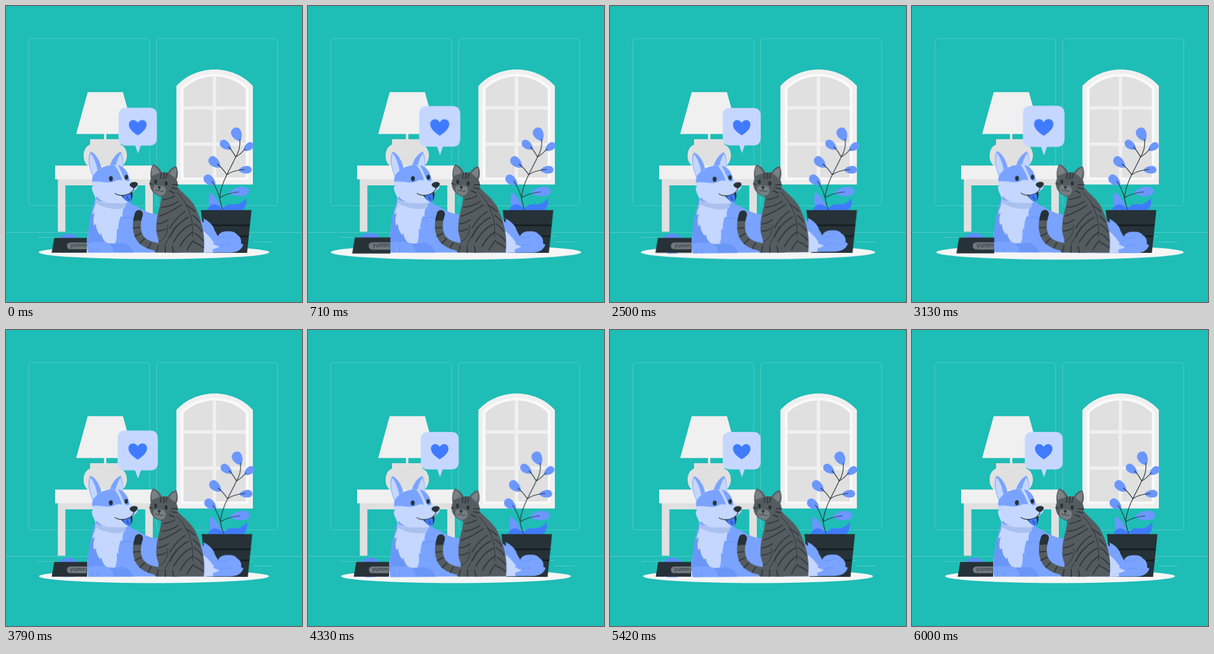
An HTML page without scripts for the animation above (6040 ms loop, 500 px wide and 500 px high).

```html
<!DOCTYPE html>
<html lang="en">
<head>
<meta charset="utf-8">
<title>Cat and dog at home</title>
<style>
html, body { margin: 0; width: 100%; height: 100%; overflow: hidden; background: #1ebdb6; }
svg { display: block; width: 100%; height: 100%; }

.rug, .bowl, .bubble, .dog, .cat, .plant { animation: 6.04s linear -15ms infinite; }
.rug { animation-name: swell; transform-origin: 250px 416.3px; }
.bowl { animation-name: swell; transform-origin: 107px 402px; }
.bubble { animation-name: pulse; transform-origin: 222.5px 210.5px; }
.dog { animation-name: sway; transform-origin: 248px 331px; }
.cat { animation-name: sway; transform-origin: 275px 342px; }
.plant { animation-name: shake; }

@keyframes swell {
  0%, 29.8%, 39.74%, 59.6%, 100% { transform: scale(1); }
  9.934%, 49.67% { transform: scale(1.1); }
}
/* four double beats per loop */
@keyframes pulse {
  0%, 7.45%, 9.934%, 14.9%, 24.834%, 32.284%, 34.768%, 39.734%, 49.668%,
  57.118%, 59.602%, 64.568%, 74.502%, 81.952%, 84.436%, 89.402%, 100% { transform: scale(1); }
  2.483%, 12.417%, 27.317%, 37.251%, 52.151%, 62.085%, 76.985%, 86.919% { transform: scale(1.1); }
}
/* four swings per loop */
@keyframes sway {
  0%, 99.338%, 100% { transform: rotate(0deg); }
  6.209%, 31.043%, 55.877%, 80.71% { transform: rotate(1deg); }
  18.626%, 43.46%, 68.294%, 93.128% { transform: rotate(-1deg); }
}
@keyframes shake {
  0%, 99.338%, 100% { transform: translateX(0); }
  9.934%, 89.404% { transform: translateX(-1px); }
  19.868%, 79.47% { transform: translateX(2px); }
  29.801%, 49.669%, 69.536% { transform: translateX(-4px); }
  39.735%, 59.603% { transform: translateX(4px); }
}

.pale { fill: #f0f0f0; }
.grey { fill: #e0e0e0; }
.white { fill: #fafafa; }
.dark { fill: #263238; }
.fur { fill: #79a3ff; }
.shade { fill: #6a96f8; }
.light { fill: #c5d7ff; }
.blue { fill: #407bff; }
.leaf { fill: #6b97ff; }
.coat { fill: #555c60; }
.line { fill: none; stroke: #263238; stroke-linecap: round; stroke-linejoin: round; }
.hair { fill: none; stroke: #ebebeb; stroke-width: .28; }
.fold { fill: none; stroke: #5f8df2; stroke-width: .8; stroke-linecap: round; }
.tabby { fill: none; stroke: #30393e; stroke-width: 2; stroke-linecap: round; }
text { font: 9px Inter, "Open Sans", sans-serif; fill: #263238; }
</style>
</head>
<body>
<svg viewBox="0 0 500 500">
  <defs>
    <path id="leaf" d="M0 0C4-7 13-10 19-8C26-5 26 5 20 8C13 10 5 7 0 0Z"/>
    <clipPath id="cut"><path d="M70 380H136.5V425H70Z"/></clipPath>
    <clipPath id="tip"><path d="M210 340H240V362L212 363Z"/></clipPath>
  </defs>

  <g class="hair">
    <rect x="38.3" y="55.1" width="204.4" height="282.6" rx="5.5"/>
    <rect x="254.5" y="55.1" width="204.4" height="282.6" rx="5.5"/>
    <path d="M0 382.4H500M52.5 391H95.6M104.5 391H111M396.6 389.4H416M416.8 398.5H450"/>
  </g>

  <g id="window">
    <path class="pale" d="M287.8 301.5V135C322 98 383 98 417 135V301.5Z"/>
    <path class="white" d="M295.6 293.5V138C326 107 379 107 409.3 138V293.5Z"/>
    <path class="grey" d="M299.8 289.8V140C328 112 377 112 405 140V289.8Z"/>
    <path class="pale" d="M349.2 118H355V290H349.2ZM299.8 169.2H405V175H299.8ZM299.8 230.5H405V236.3H299.8Z"/>
  </g>

  <g id="lamp">
    <path class="pale" d="M138 145.5H197.5L217 216.3H118.5ZM165.6 216H169.4V226H165.6Z"/>
    <path class="grey" d="M142 225H193.3V234C201 237 205 246 204.2 255C203 262 200 267 196 271H139C134 266 131 260 131.2 254C130.500 245 135 236.500 142 234Z"/>
  </g>
  <g id="table">
    <path class="grey" d="M87.5 292H248V303H100.3V381.3H87.5ZM235.3 292H248V381H235.3Z"/>
    <path class="pale" d="M83 269.5H253V292.7H83Z"/>
  </g>

  <ellipse class="rug" cx="250" cy="416" rx="194.2" ry="11.4" fill="#f5f5f5"/>

  <g class="plant">
    <g class="leaf">
      <path d="M344 315C352 318 358 328 366 345H347C341 337 342 325 344 315Z"/>
      <use href="#leaf" transform="translate(396 228) rotate(-118)"/>
      <use href="#leaf" transform="translate(401.5 244.5) rotate(-38) scale(.82 .72)"/>
      <use href="#leaf" transform="translate(380.5 242) rotate(-144) scale(.93 .8)"/>
      <use href="#leaf" transform="translate(362 272.5) rotate(-139) scale(1 .9)"/>
      <use href="#leaf" transform="translate(392.5 277.5) rotate(-4) scale(.92 .76)"/>
      <use href="#leaf" transform="translate(354 302) rotate(-143) scale(.98 .88)"/>
      <use href="#leaf" transform="translate(376.5 315.5) rotate(-6) scale(1.4 .92)"/>
    </g>
    <path class="blue" d="M340 345C342 337 350 333 356 336C360 337 363 340 366 343C369 337 376 334 383 335C393 336 400 332 405.5 324C407 333 405 340 400 345Z"/>
    <g class="line" stroke-width="1.2">
      <path d="M366 343Q361 330 361 322C363 306 368 295 373 285C379 273 384 264 388 255C394 246 396 237 395 225"/>
      <path d="M376 238Q382 244 388 255Q396 251 404 241M357 267Q365 273 373 285Q382 278 403 276M348 296Q355 305 361 324Q373 316 393 314"/>
    </g>
    <path class="dark" d="M329.2 344.8H414.7L407.2 417H337.6Z"/>
    <path fill="#151d21" d="M332 369H412.2L411.9 371.8H332.4ZM334 387.8H410.2L410 390.2H334.4Z"/>
  </g>

  <g class="dog">
    <path class="fur" d="M96 402Q104 398 113 402V416.5H96Z"/>
    <path class="fur" d="M152 318C148 340 140 358 139.5 380C136 392 136 404 138.5 416.5H345L352 398C350 384 340 369 327 360C300 350 265 354 248 351C234 348 224 339 211 334L205 320Z"/>
    <path class="fur" d="M331 358C342 362 351 371 352 378L358 389C360 384 365 380 374 380.500C382 380 388 382 390 386C396 389 398 395 397 401L401 403C398 412 390 417 376 416.500H334V360Z"/>
    <path class="light" d="M333 416.500V380C341 385 347 394 351 399L350 402C354 404 357 405 361 406C356 409 352 410 349 411L350 416.500Z"/>
    <path class="fold" d="M358 389C365 393 374 391 379 387M360 406C367 402 372 402 377 403"/>
    <path class="shade" d="M150 338C145 350 140 364 139.500 382L138 400H170L160 368Z"/>
    <path class="light" d="M151 329C152 338 147 343 146 352L150 350C147 359 147 365 149 371L152 368C152 376 155 382 159 387L161 384C162 391 165 396 170 401H184C188 394 187 384 187 376L190 378C189 368 192 361 194 355L197 356C196 347 199 340 203 333Z"/>
    <path fill="#aac0ee" d="M151 325C162 335 185 334 204 331L201 341C185 346 166 341 151 333Z"/>
    <path class="shade" d="M169 400C180 403 186 402 194 400C205 401 212 407 215 416.500H177C179 407 175 401 169 400Z"/>
    <path class="fur" d="M138 407C139 399 148 397 157 399C170 397 181 402 182 416.500H139Q136.500 411 138 407Z"/>
    <path class="fold" d="M145 408Q143 412 145 416M155 408Q153 412 155 416M193 360C203 354 216 357 226 363"/>

    <path class="fur" d="M148 290C140 277 137 254 143 246C151 249 159 261 161.500 275Z"/>
    <path class="light" d="M148 288C141 276 139 257 143 249C149 256 155 271 155 287Z"/>
    <path class="fur" d="M175 272C178 260 185 250 193.500 246C198 253 198.500 265 197 276Z"/>
    <path class="light" d="M185 271C187 262 190 254 193.800 249C197 256 198 266 196.500 276Z"/>
    <path class="light" d="M148 285C156 273 168 269 182 268.500C194 268 204 276 207 287C209 294 212 297 217 298C224 299 224 306 219 310L213 315L210 331C200 334 186 334 175 331C165 331 157 328 154 322L151 325C150 319 145 314 145 306L147 304C144 297 145 290 148 285Z"/>
    <path class="fur" d="M148 285C156 274 168 269 183 268.500C190 278 194 286 196 295C186 292 184 297 178 298C167 299 156 295 146 297C145 292 146 288 148 285Z"/>
    <path class="fur" d="M189 269C200 271 206 280 208 291C210 296 205 297 202 295C197 288 195 278 189 269Z"/>
    <ellipse class="dark" cx="177.200" cy="291.700" rx="3.300" ry="4.200"/>
    <ellipse class="dark" cx="203.300" cy="289.300" rx="3" ry="4.100"/>
    <path class="dark" d="M209 301C211 297 219 296 222 299C224 302 220 306 216 308C212 306 208 304 209 301Z"/>
    <path class="dark" d="M194 319.500C201 321 209 318 213 313.500C215 320 213 327 209 331C203 330 198 325 194 319.500Z"/>
    <path class="blue" d="M197 321.500C201 318 207 319 210 317C212 323 212 329 208 332C203 330 199 326 197 321.500Z"/>
    <path class="line" stroke-width="1.100" d="M184 316.500C192 322 206 321 214 312Q216 311 216 307M204 322L207 327"/>
  </g>

  <g class="bubble">
    <path class="light" d="M203 172.300H242Q254.500 172.300 254.500 184.800V223Q254.500 235.500 242 235.500H227.500L223 248.700L218.300 235.500H203Q190.500 235.500 190.500 223V184.800Q190.500 172.300 203 172.300Z"/>
    <path class="blue" d="M222.500 218.500C213 212.500 207.500 206.500 207.700 200C208 191.500 218.500 190 222.500 197.500C226.500 190 237 191.500 237.300 200C237.500 206.500 232 212.500 222.500 218.500Z"/>
  </g>

  <g class="cat">
    <path class="coat" d="M262 318C263 335 254 353 254 370C252 384 258 391 258 399L250 407Q249 413 253 416.500H334C337 392 333 368 320 340C313 326 298 316 288 304Z"/>
    <g fill="none" stroke-linecap="round" stroke-width="13.500">
      <path stroke="#555c60" d="M224.500 351.500C219 368 220 384 228 394C238 406 260 410 292 410"/>
      <path stroke="#263238" clip-path="url(#tip)" d="M224.500 351.500C219 368 220 384 228 394"/>
    </g>
    <path class="tabby" d="M215.500 375L226 374M218 389L228 384M226 401L234 393M240 409L245 400M255 415L257 405M269 416V405M283 416L281 406"/>
    <path class="tabby" d="M266 327Q278 325 285 321M263 340Q278 339 291 330M259 355Q277 349 296 336M256 368Q266 367 274 361M256 380Q264 380 270 376M277 375Q288 356 303 347M277 390Q288 367 308 357M283 399Q296 376 313 369M294 406Q304 388 316 382M306 412Q311 402 317 396M304 336Q313 341 319 347M316 354Q323 359 327 365M318 368Q327 374 331 381M319 384Q327 389 333 396M318 399Q326 402 333 408"/>
    <path class="line" stroke-width="1" d="M289 315C307 334 318 358 315 390M258 398C269 394 274 382 273 370M269 402C275 393 280 381 287 372"/>
    <path class="coat" d="M244.500 292C243 280 245 271 249 267.500C256 270 261 276 263 281L274 281C277 275 283 271 288 271C291 279 291 287 288 293C292 301 291 312 284 317C276 324 262 325 254 319C245 314 240 302 244.500 292Z"/>
    <path fill="#7a8185" d="M246 287C245 279 246 273 249.500 270C255 273 258 278 259.500 282ZM276 283C279 277 283 274 286.800 273.500C289 280 288 286 285.500 291Z"/>
    <path fill="#777e82" d="M249 307C251 302 255 302 259 304C264 302 270 305 270 311C270 318 264 322 258 320C252 317 248 313 249 307Z"/>
    <path class="tabby" d="M262 283L261 291M267 282L266 292M272 283L270 291M290 302L281 302M289 309L280 307M284 316L276 312M243 300L247 301"/>
    <ellipse class="dark" cx="252.800" cy="297" rx="2.500" ry="3.700"/>
    <ellipse class="dark" cx="270.500" cy="299.800" rx="2.500" ry="3.700"/>
    <path class="dark" d="M256 304.500Q259 303.500 262 305.500Q260 308.500 258.700 308.700Q256.500 307 256 304.500Z"/>
    <path class="line" stroke-width=".9" d="M258.700 308V311Q256 314 252.500 310.500M258.700 311Q261 315 265.500 312.500"/>
  </g>

  <g class="bowl">
    <g clip-path="url(#cut)">
      <path fill="#5c8cff" d="M91.500 393C91 389 94 387 97 387C99 384 103 385 105 385.500C108 384 112 385 114 387C118 387 120.500 390 120 393Z"/>
      <path class="dark" d="M81.500 391.800H140V416.700H77.200Z"/>
      <rect x="102.800" y="399.400" width="38" height="11.400" rx="5.700" fill="#747b7f"/>
      <text x="108.600" y="407.300">yummy</text>
    </g>
  </g>
</svg>
</body>
</html>
```
